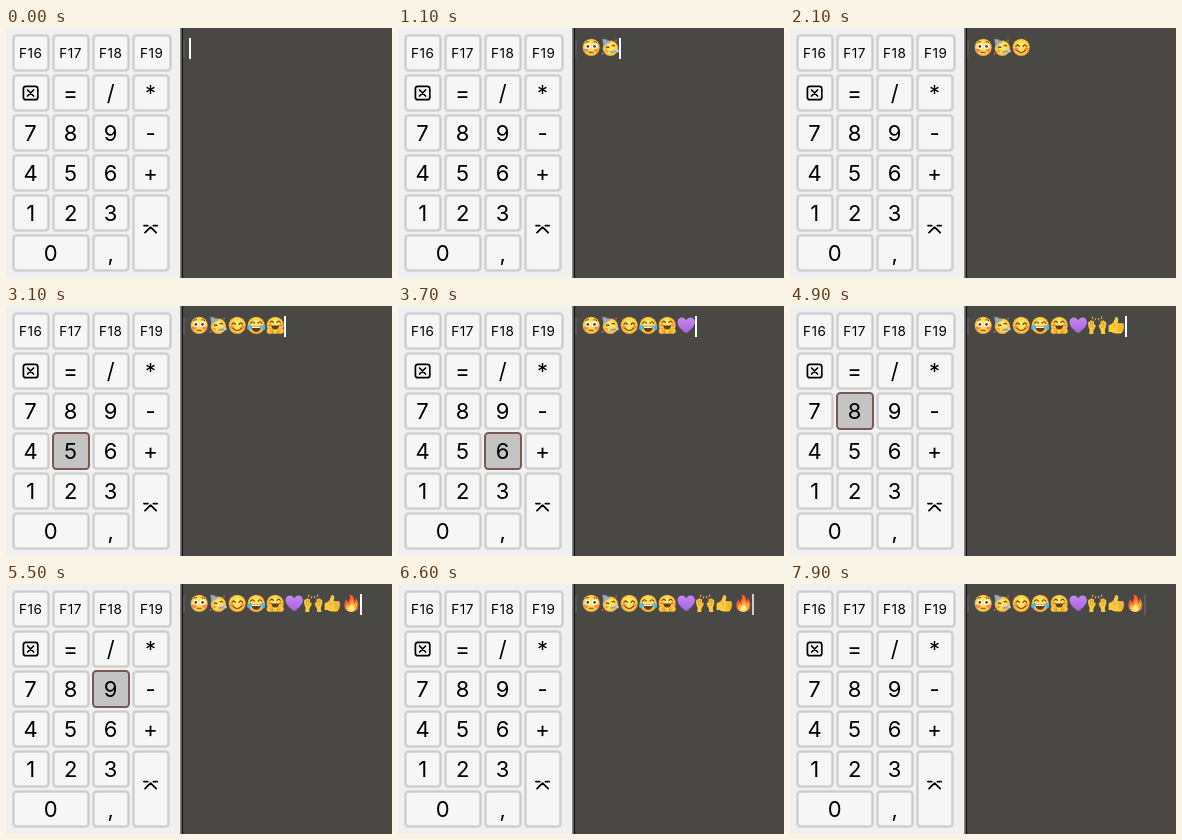
Write an HTML page with a canvas that moves like this. It is 386 px wide and 250 px high and loops after 8000 ms.

```html
<!DOCTYPE html>
<html lang="en">
<head>
<meta charset="utf-8">
<title>Emoji keypad</title>
<style>
html, body { margin: 0; width: 100%; height: 100%; overflow: hidden; background: #494845; }
canvas { display: block; width: 386px; height: 250px; }
</style>
</head>
<body>
<canvas id="stage"></canvas>
<script>
const W = 386, H = 250, LOOP = 8000, TICK = 100, HOLD = 200;
const canvas = document.getElementById('stage');
const ctx = canvas.getContext('2d');
const dpr = window.devicePixelRatio || 1;
canvas.width = W * dpr;
canvas.height = H * dpr;

// Press times of the keys 1 to 9
const presses = [300, 900, 1500, 2500, 3100, 3700, 4400, 4900, 5400];

// Label, column, row, column span, row span
const keys = [
  ['F16', 0, 0], ['F17', 1, 0], ['F18', 2, 0], ['F19', 3, 0, 1.05],
  ['clear', 0, 1], ['=', 1, 1], ['/', 2, 1], ['*', 3, 1],
  ['7', 0, 2], ['8', 1, 2], ['9', 2, 2], ['-', 3, 2],
  ['4', 0, 3], ['5', 1, 3], ['6', 2, 3], ['+', 3, 3],
  ['1', 0, 4], ['2', 1, 4], ['3', 2, 4], ['enter', 3, 4, 1, 2],
  ['0', 0, 5, 2], [',', 2, 5]
];

function disc(x, y, rx, color, ry = rx) {
  ctx.fillStyle = color;
  ctx.beginPath();
  ctx.ellipse(x, y, rx, ry, 0, 0, Math.PI * 2);
  ctx.fill();
}

function fillPath(d, color) {
  ctx.fillStyle = color;
  ctx.fill(new Path2D(d));
}

function strokePath(d, color, width) {
  ctx.strokeStyle = color;
  ctx.lineWidth = width;
  ctx.stroke(new Path2D(d));
}

function box(x, y, w, h, r, fill, line, width) {
  ctx.beginPath();
  ctx.roundRect(x, y, w, h, r);
  ctx.fillStyle = fill;
  ctx.fill();
  ctx.strokeStyle = line;
  ctx.lineWidth = width;
  ctx.stroke();
}

function drawKey([label, col, row, cols = 1, rows = 1], down) {
  const x = 6 + col * 40, y = 6 + row * 40;
  const w = cols * 40 - 2, h = rows * 40 - 2;
  const cx = x + w / 2 - 0.4, cy = y + h / 2;
  if (down) {
    box(x + 1, y + 1, w - 2, h - 2, 3.5, '#c4c4c4', '#7b5755', 2);
  } else {
    box(x + 1.5, y + 1.5, w - 3, h - 3, 3, '#f6f6f6', '#dadada', 3);
    box(x + 1.5, y + 1.5, w - 3, h - 3, 3, 'transparent', '#cbcbcb', 1);
  }
  if (label === 'clear') {
    box(cx - 7.2, cy - 6.7, 14.4, 13.4, 2.5, 'transparent', '#000', 1.7);
    strokePath(`M${cx - 3} ${cy - 3}l6 6m0-6l-6 6`, '#000', 1.7);
  } else if (label === 'enter') {
    strokePath('M138 197.6h3.8m5.6 0h3.8M139 204.6l5.6-5.4 5.6 5.4', '#000', 1.8);
  } else {
    const small = label.length > 1;
    ctx.font = `${small ? 13.5 : 22}px Inter, sans-serif`;
    ctx.letterSpacing = small ? '0.5px' : '0px';
    ctx.fillStyle = '#000';
    ctx.fillText(label, cx, cy + (small ? 5 : 8));
  }
}

function face() {
  const g = ctx.createRadialGradient(0, -2, 2, 0, 0, 8.8);
  g.addColorStop(0, '#ffe766');
  g.addColorStop(0.7, '#fdd044');
  g.addColorStop(1, '#e6a033');
  disc(0, 0, 8.6, g);
}

function pair(draw) {
  draw();
  ctx.save();
  ctx.scale(-1, 1);
  draw();
  ctx.restore();
}

const BROWN = '#6b3d12', GOLD = '#fccb3c', SHADE = '#d48d20';

const emoji = [
  function flushed() {
    face();
    pair(() => {
      disc(5.2, 3, 2.4, '#f58a55', 1.7);
      disc(3.5, -1, 2.7, '#fff');
      disc(3.4, -0.9, 1.4, BROWN);
      strokePath('M2.6-5.6q2-.4 3 .8', BROWN, 0.9);
    });
    strokePath('M-2 5h4', BROWN, 1.1);
  },
  function party() {
    ctx.save();
    ctx.translate(0.2, 1);
    ctx.scale(0.9, 0.9);
    face();
    ctx.restore();
    fillPath('M-7.8-8.8L.8-5.6Q-3.4-4.4-6.6-.4z', '#a79bb0');
    strokePath('M-7-5.6l3-1.9M-6.4-2.6l4.6-3.4', '#83bccb', 1.1);
    strokePath('M-4 .6q1.4-1.8 2.8-.4M1.8-1.4q1.6-1.4 2.6.2', BROWN, 1.1);
    disc(-3.6, 3.8, 1.6, '#f39a4b', 1.2);
    strokePath('M1 4.6L6.6 3.8', '#8ba9b8', 2);
    disc(7, 3.6, 1.6, '#c9c7d0');
    disc(5.8, -6.8, 0.9, '#e65765');
    disc(-7.6, 6.5, 0.9, '#d269a5');
  },
  function smiling() {
    face();
    pair(() => {
      disc(5.4, 1.8, 2.3, '#f58c48', 1.6);
      strokePath('M1.9-.9q1.6-2.9 3.4 0', BROWN, 1.2);
    });
    strokePath('M-4.2 3q4.2 4.4 8.4 0', BROWN, 1.2);
  },
  function joy() {
    face();
    fillPath('M-5 1h10q-.5 5.6-5 5.6T-5 1z', BROWN);
    fillPath('M-4.5 1.2h9l-.5 1.6h-8z', '#fff');
    pair(() => {
      strokePath('M1.8-2.2q1.8-2.7 3.8 0', BROWN, 1.2);
      fillPath('M5.6-.8q4 1 3.5 4-.7 2.4-2.9 1.4-1.8-1.2-.6-5.4z', '#50b5ee');
    });
  },
  function hug() {
    face();
    pair(() => {
      disc(5.4, 0, 1.9, '#f58c48', 1.4);
      strokePath('M1.8-2.8q1.6-2.6 3.3 0', BROWN, 1.2);
    });
    fillPath('M-4 .2h8q-.4 4.1-4 4.1T-4 .2z', BROWN);
    pair(() => {
      disc(5.3, 5.8, 3.4, SHADE, 2.9);
      disc(5.4, 5.7, 2.9, GOLD, 2.4);
      strokePath('M2.8 4.2l2.4 1.2M2.6 6.2l2.4.2', SHADE, 0.7);
    });
  },
  function heart() {
    const g = ctx.createLinearGradient(0, -8, 0, 8);
    g.addColorStop(0, '#c58af3');
    g.addColorStop(1, '#a561de');
    fillPath('M0 8C-5 4.5-8.7 1-8.7-3.2-8.7-8.6-2-9.5 0-4.8 2-9.5 8.7-8.6 8.7-3.2 8.7 1 5 4.5 0 8z', g);
  },
  function hands() {
    pair(() => {
      fillPath('M4 8.6L3.6 4.6Q1.6 2.8 1.4-.2q.6-1.2 1.6.2L3.4-4q.8-.9 1.5 0l.4-.8q.8-.7 1.4.2l.7.6q.9-.2 1 .8.9.2.8 1.2Q9 2 7.6 4.4l.5 4.2z', GOLD);
      strokePath('M3.4 2.6Q5 .8 7 1.2M4.9-3.2v2.6M6.8-3.2l-.2 2.6', SHADE, 0.8);
      strokePath('M2-5.2l-.6-1.6M4.6-6.6l-.2-1.8', GOLD, 0.9);
    });
  },
  function thumb() {
    fillPath('M-7.6 0q3.2-.4 4.8-3L-.6-8.2q2.9-.3 2.6 3L1.4-2h4.8q2 .3 1.5 2.2.7 1.1-.1 2.3.3 1.3-.6 2.1.1 1.4-1 2-.3 1.6-2 1.6H-.2Q-3.8 8-4.6 6.8h-3z', GOLD);
    strokePath('M2.4.4h5M2.4 2.7h5M2.3 4.8h4.5M-2.8-2.5Q-1.2-.8-1.8 1.6', SHADE, 0.8);
  },
  function fire() {
    fillPath('M-1.4-9Q3.3-6.8 3.4-2.4 4.8-3.2 4.6-5.2 7.8-1.4 7.2 3 6.4 8.6 0 8.8-6.3 8.5-6.9 3-7.1-.8-4.8-4-4.6-1.9-3.4-1.2-.3-4.4-1.4-9z', '#f0642c');
    fillPath('M.2-4.6Q3-.8 2.8.8L5-1.2Q6.6 3.2 5 6 3 8.6 0 8.6-4.2 8.4-5.4 5.3-5.8 2.4-4.2.4L-2.5 1.5Q.8-1 .2-4.6z', '#fcaa38');
    fillPath('M.2.4Q4 4.2 3.4 6.4 2.4 8.5 0 8.5-3 8.2-3.5 6-3.2 4-1.6 3.2-.1 3 .2.4z', '#ffe888');
  }
];

// The caret stays lit for a moment after typing, then fades out and back in.
function caretAlpha(sinceTyping) {
  const wait = sinceTyping - 350;
  if (wait <= 0) return 1;
  const u = wait % 965;
  if (u < 250) return 1 - u / 250;
  if (u < 670) return 0;
  return Math.min(1, (u - 670) / 250);
}

function rect(x, y, w, h, color) {
  ctx.fillStyle = color;
  ctx.fillRect(x, y, w, h);
}

function drawPanels() {
  rect(0, 0, 174, H, '#f0f0f0');
  rect(174, 0, 1, H, '#858583');
  rect(175, 0, 1, H, '#5f5f5c');
  rect(176, 0, 1, H, '#10100f');
  rect(177, 0, W - 177, H, '#494845');
  rect(177, 12, 2, 17, '#585753');
}

function render(t) {
  ctx.setTransform(dpr, 0, 0, dpr, 0, 0);
  ctx.textAlign = 'center';
  ctx.lineCap = ctx.lineJoin = 'round';
  drawPanels();

  const count = presses.filter(p => p <= t).length;
  const last = count ? presses[count - 1] : -300;
  const held = count && t - last < HOLD ? String(count) : '';
  for (const key of keys) drawKey(key, key[0] === held);

  for (let i = 0; i < count; i++) {
    ctx.save();
    ctx.translate(193.2 + i * 19, 19.3);
    emoji[i]();
    ctx.restore();
  }

  ctx.globalAlpha = caretAlpha(t - last);
  rect(183 + count * 19, 10, 2, 21, '#fff');
  ctx.globalAlpha = 1;
}

const start = performance.now();
function loop() {
  const t = (performance.now() - start) % LOOP;
  render(Math.floor(t / TICK) * TICK);
  requestAnimationFrame(loop);
}
loop();
</script>
</body>
</html>
```
